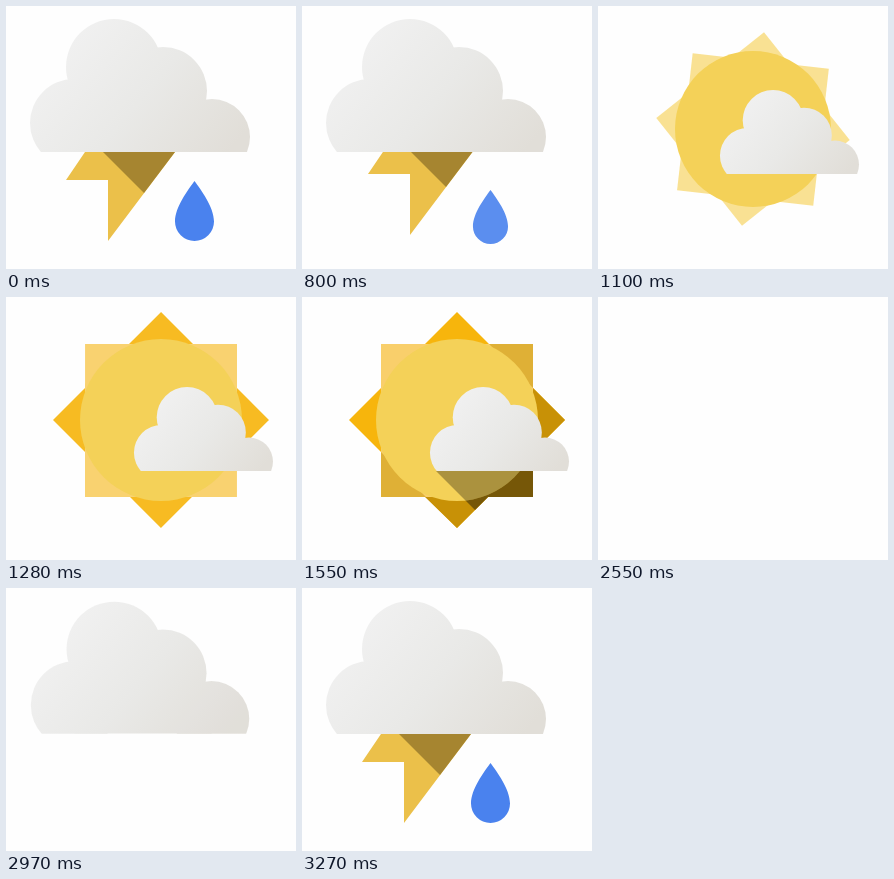
These frames come from a looping animation (290x263 px, 3300 ms). An HTML page:

```html
<!DOCTYPE html>
<html lang="en">
<head>
<meta charset="utf-8">
<title>Weather</title>
<style>
  html, body { margin: 0; width: 100%; height: 100%; overflow: hidden; background: #fefefe; }
  svg { display: block; width: 100%; height: 100%; }
</style>
</head>
<body>
<svg viewBox="0 0 290 263">
  <defs>
    <linearGradient id="grey" gradientUnits="userSpaceOnUse" x1="60" y1="25" x2="215" y2="155">
      <stop offset="0" stop-color="#f1f1f1"/>
      <stop offset=".5" stop-color="#e9e9e7"/>
      <stop offset="1" stop-color="#e1ded8"/>
    </linearGradient>
    <clipPath id="flat"><rect width="290" height="146"/></clipPath>
    <clipPath id="below"><rect y="146" width="290" height="117"/></clipPath>
    <clipPath id="disc"><circle r="81"/></clipPath>
    <g id="cloud" clip-path="url(#flat)" fill="url(#grey)">
      <circle cx="108" cy="61" r="48"/>
      <circle cx="157" cy="85" r="44"/>
      <circle cx="206" cy="131" r="38"/>
      <circle cx="68" cy="117" r="44"/>
      <rect x="68" y="100" width="138" height="46"/>
    </g>
  </defs>

  <g id="storm">
    <g clip-path="url(#below)">
      <g id="bolt">
        <path fill="#ebc04a" d="M79 146L60 174H102V235L169 146Z"/>
        <path fill="#a68530" d="M97 146H169L138 187Z"/>
      </g>
    </g>
    <path id="drop" fill="#4a82ee" d="M188.5 175C195 184 208 201 208 215.5A19.5 19.5 0 0 1 169 215.5C169 201 182 184 188.5 175Z"/>
    <use id="big" href="#cloud"/>
  </g>

  <g id="sun">
    <g transform="translate(155 123)">
      <g id="rays">
        <path id="diamond" d="M0-108L108 0L0 108L-108 0Z"/>
        <path id="square" d="M-76-76H76V77H-76Z"/>
      </g>
      <g id="shade">
        <path fill="#c89106" d="M76-32L108 0L76 32ZM-32 77L0 108L31 77Z"/>
        <path fill="#dfb036" d="M32-76H76V-32ZM-76 32V77H-31ZM76 32V77H31Z"/>
        <path fill="#765708" d="M-21 51L18 90L31 77H76V51Z"/>
      </g>
      <circle id="core" r="81" fill="#f4d158"/>
      <g clip-path="url(#disc)">
        <path id="cast" d="M-21 51L18 90L31 77H76V51Z"/>
      </g>
    </g>
    <g id="small"><use href="#cloud" transform="translate(112.8 81.8) scale(.632)"/></g>
  </g>
</svg>
<script>
  const LOOP = 3300, STEP = 30;
  const SUN = 800, STORM = 2550;
  const el = {};
  document.querySelectorAll('svg [id]').forEach(n => { el[n.id] = n; });

  const clamp = v => Math.min(1, Math.max(0, v));
  const part = (t, from, to) => clamp((t - from) / (to - from));
  const move = (n, v) => n.setAttribute('transform', v);
  const fade = (n, v) => n.setAttribute('opacity', clamp(v));
  const show = (n, on) => n.setAttribute('visibility', on ? 'visible' : 'hidden');
  const mix = (a, b, k) => `rgb(${a.map((v, i) => Math.round(v + (b[i] - v) * k))})`;
  const zoom = (x, y, s, dy = 0) =>
    `translate(${x} ${y + dy}) scale(${Math.max(s, 0.001)}) translate(${-x} ${-y})`;

  const PALE = [249, 219, 121], ORANGE = [247, 181, 12], SAND = [249, 207, 107];

  function setStorm(cloudScale, cloudAlpha, shift, dropScale, dropAlpha, dropY) {
    move(el.big, zoom(139, 106, cloudScale));
    fade(el.big, cloudAlpha);
    move(el.bolt, `translate(${shift} ${-shift})`);
    move(el.drop, zoom(188.5, 205, dropScale, dropY));
    fade(el.drop, dropAlpha);
  }

  function stormIn(t) {
    const rest = (1 - part(t, STORM, 3060)) ** 2;
    const gap = (1 - part(t, 3060, 3270)) ** 2;
    setStorm(1 - 0.227 * rest, 1 - rest, 90 * gap, 1 - 0.6 * gap, 1 - gap, -32 * gap);
  }

  function stormOut(t) {
    const u = part(t, SUN - STEP, 920);
    const gone = clamp((u - 0.2) / 0.8);
    const size = clamp(1 - 2.5 * u * u);
    setStorm(1 - 0.24 * gone, 1 - gone, 150 * u * u, size, size, 100 * u ** 1.75);
  }

  function sunIn(t) {
    const p = part(t, 920, 1310);
    const rest = (1 - p) ** 3;
    const warm = part(t, 1100, 1310);
    const dark = part(t, 1310, 1550);
    fade(el.sun, p * 2.5);
    move(el.core, `scale(${1 - 0.237 * rest})`);
    move(el.rays, `rotate(${41.6 * rest}) scale(${1 - 0.63 * rest})`);
    fade(el.rays, 0.8 + 0.2 * warm);
    el.diamond.setAttribute('fill', mix(PALE, ORANGE, warm));
    el.square.setAttribute('fill', mix(PALE, SAND, warm));
    move(el.small, `translate(${-38.5 * rest} ${-38.5 * rest})`);
    fade(el.shade, dark);
    fade(el.cast, 0.3 * dark);
  }

  function draw(ms) {
    let t = ms % LOOP;
    const base = t < STORM ? SUN : STORM;
    if (t >= SUN) t = base + Math.floor((t - base) / STEP) * STEP;
    const sunny = t >= 920 && t < STORM;
    show(el.storm, !sunny);
    show(el.sun, sunny);
    if (sunny) sunIn(t);
    else if (t >= STORM) stormIn(t);
    else if (t >= SUN) stormOut(t);
    else setStorm(1, 1, 0, 1, 1, 0);
  }

  const start = performance.now();
  function tick() {
    draw(performance.now() - start);
    requestAnimationFrame(tick);
  }
  tick();
</script>
</body>
</html>
```
